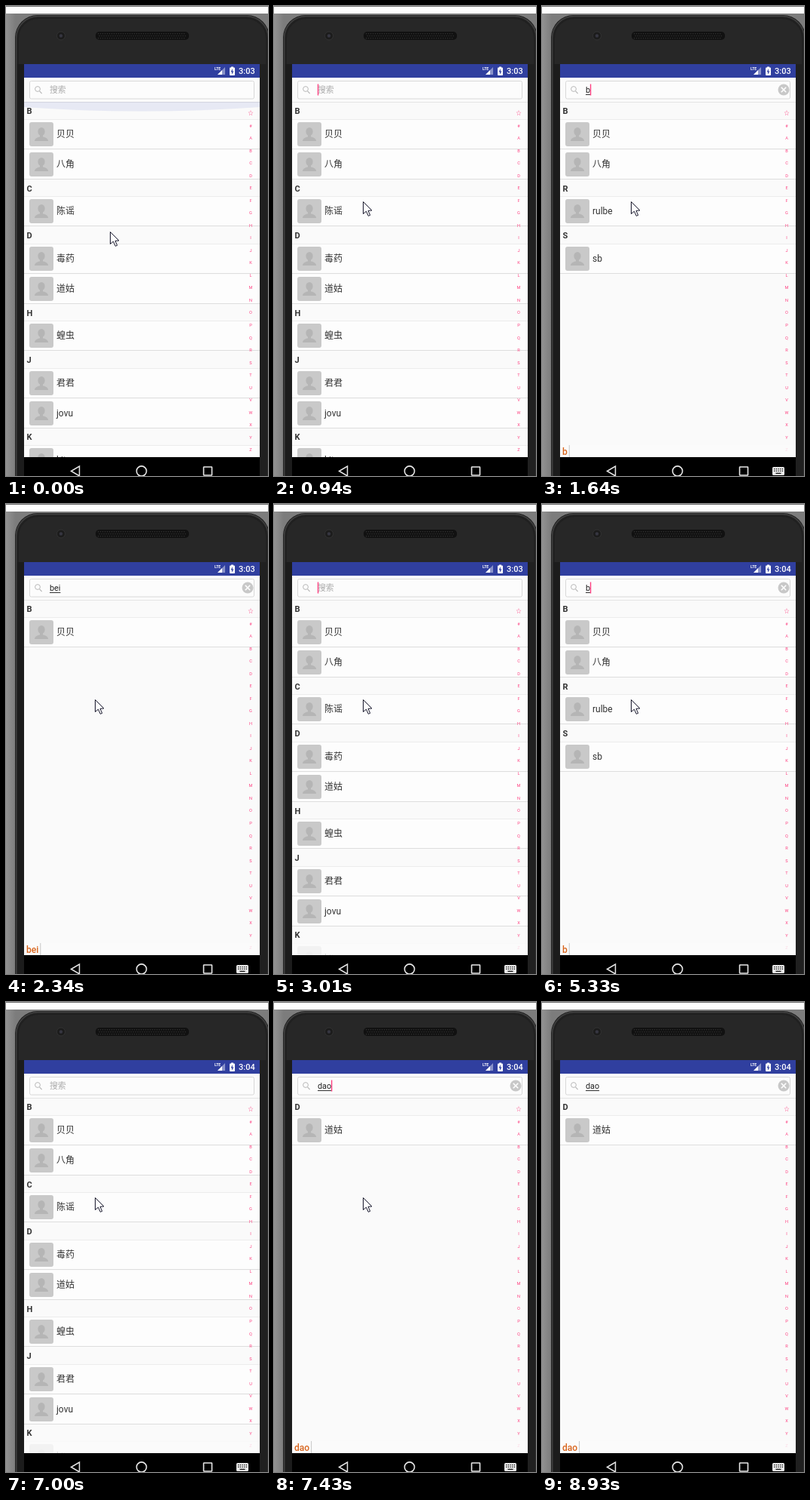
Recreate the animation shown at these times as an HTML page with a canvas. Size 348 by 623 pixels, loop 9060 ms.

```html
<!DOCTYPE html>
<html lang="zh">
<head>
<meta charset="utf-8">
<title>Contact search</title>
<style>
  html, body { margin: 0; width: 100%; height: 100%; overflow: hidden; background: #888; }
  canvas { display: block; width: 348px; height: 623px; }
</style>
</head>
<body>
<canvas id="stage"></canvas>
<script>
const canvas = document.getElementById('stage');
const ratio = window.devicePixelRatio || 1;
canvas.width = 348 * ratio;
canvas.height = 623 * ratio;
const c = canvas.getContext('2d');
c.scale(ratio, ratio);

const LOOP = 9060;
const FONT = 'Roboto, "Noto Sans CJK SC", "Noto Sans CJK", "DejaVu Sans", sans-serif';
const PINK = '#ff4081';

// section, name, searchable spelling
const contacts = [
  ['B', '贝贝', 'beibei'], ['B', '八角', 'bajiao'], ['C', '陈谣', 'chenyao'],
  ['D', '毒药', 'duyao'], ['D', '道姑', 'daogu'], ['H', '蝗虫', 'huangchong'],
  ['J', '君君', 'junjun'], ['J', 'jovu', 'jovu'], ['K', 'kito', 'kito'],
  ['R', 'rulbe', 'rulbe'], ['S', 'sb', 'sb']
];

// time, query, keyboard suggestion, caret visible
const typing = [
  [0, '', '', 0], [940, '', '', 1], [1370, '', '', 0],
  [1520, '', 'b', 1], [1640, 'b', 'b', 1], [1790, 'bei', 'bei', 1], [2340, 'bei', 'bei', 0],
  [2650, 'be', 'be', 1], [2770, 'b', 'b', 1], [2890, '', 'b', 1], [3010, '', '', 1],
  [3540, '', '', 0], [4100, '', '', 1], [4250, '', 'b', 1], [4400, 'ba', 'ba', 1],
  [4930, 'ba', 'ba', 0], [5330, 'b', 'b', 1], [5450, '', '', 1], [5880, '', '', 0],
  [6440, '', '', 1], [7000, '', '', 0], [7150, 'da', 'da', 1], [7430, 'dao', 'dao', 1],
  [7830, 'dao', 'dao', 0], [8390, 'dao', 'dao', 1], [8930, 'dao', 'dao', 0]
];

// time, x, y
const pointer = [
  [0, 138, 299], [120, 145, 330], [240, 149, 374], [390, 132, 386], [540, 126, 318],
  [660, 118, 259], [8540, 190, 375], [8660, 311, 601], [8780, -50, 0]
];

const at = (steps, t) => steps.findLast(s => s[0] <= t);

function rect(x, y, w, h, fill) {
  c.fillStyle = fill;
  c.fillRect(x, y, w, h);
}

function round(x, y, w, h, r, fill, stroke, width = 1) {
  c.beginPath();
  c.roundRect(x, y, w, h, r);
  if (fill) { c.fillStyle = fill; c.fill(); }
  if (stroke) { c.strokeStyle = stroke; c.lineWidth = width; c.stroke(); }
}

function disc(x, y, r, fill, stroke, width = 1) {
  round(x - r, y - r, 2 * r, 2 * r, r, fill, stroke, width);
}

function path(points, fill, stroke, width = 1, close = true) {
  c.beginPath();
  points.forEach(([x, y]) => c.lineTo(x, y));
  if (close) c.closePath();
  if (fill) { c.fillStyle = fill; c.fill(); }
  if (stroke) { c.strokeStyle = stroke; c.lineWidth = width; c.stroke(); }
}

function text(s, x, y, size, fill, weight = 400, align = 'left') {
  c.font = `${weight} ${size}px ${FONT}`;
  c.textAlign = align;
  c.fillStyle = fill;
  c.fillText(s, x, y);
  return c.measureText(s).width;
}

function drawPhone() {
  const side = c.createLinearGradient(0, 0, 13, 0);
  side.addColorStop(0, '#929292');
  side.addColorStop(1, '#7c7c7c');
  rect(0, 0, 348, 623, side);
  rect(0, 0, 348, 10, '#fdfdfd');
  rect(0, 0, 348, 1, '#707070');
  round(12, 12, 338, 680, 30, '#191919');
  round(13.5, 13.5, 335, 680, 29, '#272727', '#414141', 1.5);
  round(16, 16, 330, 680, 27, '#272727', '#202020', 2);
  rect(15, 77, 9, 546, '#1c1c1c');
  rect(337, 77, 9, 546, '#202020');

  disc(73, 39.5, 5.5, '#1c1c1c', '#333');
  disc(73, 39.5, 2.2, '#363640');
  round(119, 34, 124, 11, 5, '#111');
  for (let i = 0; i < 39; i++)
    for (let j = 0; j < 3; j++) rect(122 + i * 3 + (j % 2) * 1.5, 36 + j * 3, 1.3, 1.3, '#303030');
}

function drawStatus(t) {
  rect(24, 77, 313, 18, '#303f9f');
  text('LTE', 277, 85, 5, '#fff', 700);
  path([[281, 91], [291, 81], [291, 91]], '#8992c9');
  path([[281, 91], [287, 85], [287, 91]], '#fff');
  rect(299, 80.5, 3, 2, '#fff');
  round(297, 81.5, 7, 10.5, 1, '#fff');
  path([[301, 83], [298.6, 87.4], [300.2, 87.4], [299.8, 91], [302.5, 86.4], [300.8, 86.4]], '#303f9f');
  text(t < 5050 ? '3:03' : '3:04', 309, 90, 11, '#fff', 500);
}

function drawSearch(query, caret) {
  rect(24, 95, 313, 32, '#fbfbfb');
  round(31.5, 99.5, 298, 23.5, 2, '#fcfcfc', '#d8d8d8');
  disc(42, 110, 3.4, null, '#b9b9b9');
  path([[44.4, 112.6], [47.6, 116]], null, '#b9b9b9', 1.1, false);
  let width = 0;
  if (query) {
    width = text(query, 58, 115, 10.8, '#222');
    rect(58, 117, width, 1, '#333');
    disc(321, 111, 7.5, '#c8c8c8');
    path([[317.8, 107.8], [324.2, 114.2]], null, '#fff', 1.6, false);
    path([[324.2, 107.8], [317.8, 114.2]], null, '#fff', 1.6, false);
  } else {
    text('搜索', 58, 115, 10.8, '#aaa');
  }
  if (caret) rect(57.8 + width, 103.5, 1.4, 15, PINK);
}

function drawAvatar(x, y) {
  round(x, y, 32, 32, 3, '#c9c9c9');
  c.fillStyle = '#b5b5b5';
  c.beginPath();
  c.ellipse(x + 16, y + 12.5, 4.6, 5.6, 0, 0, 7);
  c.fill();
  rect(x + 14, y + 16, 4, 5, '#b5b5b5');
  c.beginPath();
  c.moveTo(x + 7, y + 25);
  c.quadraticCurveTo(x + 7, y + 21, x + 13, y + 19.5);
  c.lineTo(x + 19, y + 19.5);
  c.quadraticCurveTo(x + 25, y + 21, x + 25, y + 25);
  c.fill();
}

function drawList(query) {
  rect(24, 127, 313, 471, '#fafafa');
  rect(24, 127, 313, 1, '#e4e4e4');
  let y = 127.4, section = '';
  for (const [letter, name, key] of contacts) {
    if (y > 598) break;
    if (!key.includes(query)) continue;
    if (letter !== section) {
      section = letter;
      text(letter, 27.5, y + 15.8, 11, '#333', 700);
      y += 22.6;
      rect(24, Math.round(y), 313, 1, '#ececec');
    }
    const top = Math.round(y);
    rect(24, top + 1, 313, 39, '#fdfdfd');
    drawAvatar(31, top + 4);
    text(name, 67, top + 24.3, 12, '#333');
    y += 39.9;
    rect(24, Math.round(y) - 1, 313, 1, '#dedede');
  }
}

function drawGlow(strength) {
  c.fillStyle = `rgba(63, 81, 181, ${0.1 * strength})`;
  c.beginPath();
  c.moveTo(24, 127);
  c.lineTo(337, 127);
  c.lineTo(337, 134);
  c.quadraticCurveTo(180, 145, 24, 134);
  c.fill();
}

function drawIndex() {
  [...'☆#ABCDEFGHIJKLMNOPQRSTUVWXYZ'].forEach((letter, i) =>
    text(letter, 325, 144 + i * 16.53, i ? 5.6 : 7, PINK, 400, 'center'));
}

function drawSuggestion(word) {
  rect(24, 582, 313, 16, 'rgba(252, 252, 252, .82)');
  if (!word) return;
  const width = text(word, 27, 594.5, 12, '#d8641c', 500);
  rect(29 + width, 582, 1, 16, '#c8c8c8');
}

function drawNav(keyboard) {
  rect(24, 598, 313, 25, '#000');
  path([[97.5, 610], [97.5, 623], [86.5, 616.5]], null, '#e8e8e8', 1.5);
  disc(180, 616.5, 6.6, null, '#e8e8e8', 1.6);
  round(262.5, 611, 11, 11, 0.5, null, '#e8e8e8', 1.6);
  if (!keyboard) return;
  round(306, 611, 16, 11, 1.5, '#e8e8e8');
  for (let i = 0; i < 5; i++)
    for (let j = 0; j < 2; j++) rect(308 + i * 2.7, 613 + j * 2.7, 1.3, 1.3, '#111');
  rect(310.5, 618.8, 7, 1.3, '#111');
}

function drawPointer(x, y) {
  const shape = [[0, 0], [0, 16], [4, 12.6], [6.8, 18.8], [9.2, 17.8], [6.5, 11.8], [11.5, 11.5]];
  path(shape.map(([dx, dy]) => [x + 0.5 + dx, y + 0.5 + dy]), '#fff', '#15152a');
}

function draw(t) {
  const [, query, word, caret] = at(typing, t);
  const [, x, y] = at(pointer, t);
  const keyboard = t >= 1520;
  drawPhone();
  c.save();
  c.beginPath();
  c.rect(24, 77, 313, 521);
  c.clip();
  drawList(query);
  if (t < 240) drawGlow(t < 120 ? 1 : 0.5);
  drawIndex();
  drawStatus(t);
  drawSearch(query, caret);
  if (keyboard) drawSuggestion(word);
  c.restore();
  drawNav(keyboard);
  drawPointer(x, y);
}

const start = performance.now();
function tick() {
  draw((performance.now() - start) % LOOP);
  requestAnimationFrame(tick);
}
tick();
</script>
</body>
</html>
```
